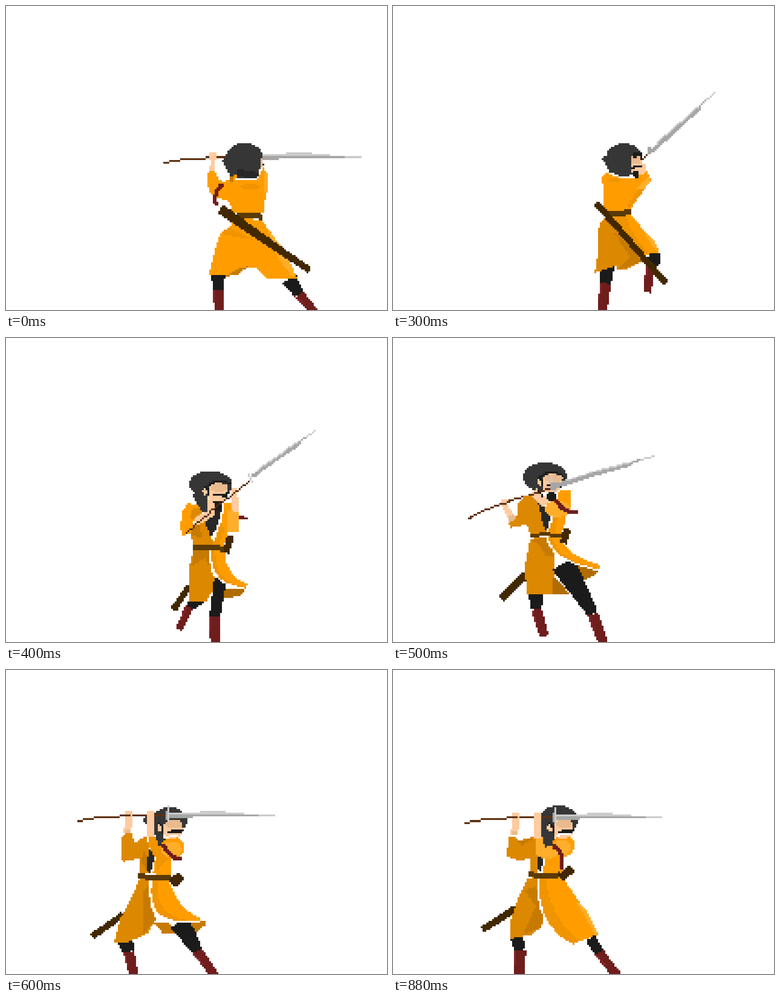
An HTML page with a canvas that plays this animation: 838 px wide and 669 px high, repeating every 1000 ms.

```html
<!DOCTYPE html>
<html>
<head>
<meta charset="utf-8">
<title>Lance guard turn</title>
<style>
html, body { margin: 0; width: 100%; height: 100%; overflow: hidden; background: #fff; }
canvas { display: block; }
</style>
</head>
<body>
<canvas id="stage" width="838" height="669"></canvas>
<script>
const COLS = 208, ROWS = 166, CELL = 838 / COLS;
const ORANGE = '#ff9d00', GLOW = '#ffae2b', SOFT = '#f09400', SHADE = '#dc8800', DEEP = '#c67a00', UNDER = '#b06c00';
const HAIR = '#363636', DARK = '#272727', BLACK = '#1b1b1b', SKIN = '#ffcb9f', TAN = '#e9ba8e';
const BOOT = '#6f1d1d', RED = '#85262a', BELT = '#5a3a08', SHEATH = '#422800', WOOD = '#5e3111';
const PALE = '#cbcbcb', STEEL = '#a6a6a6', WHITE = '#fff';

const stage = document.getElementById('stage').getContext('2d');
let g;

// ---- Drawing on the coarse grid, in stage units, without smoothing ----

function poly(color, ...p) {
  g.fillStyle = color;
  const n = p.length;
  for (let row = 0; row < ROWS; row++) {
    const y = (row + 0.5) * CELL, hits = [];
    for (let i = 0; i < n; i += 2) {
      const x1 = p[i], y1 = p[i + 1], x2 = p[(i + 2) % n], y2 = p[(i + 3) % n];
      if (y1 <= y !== y2 <= y) hits.push(x1 + (y - y1) / (y2 - y1) * (x2 - x1));
    }
    hits.sort((a, b) => a - b);
    for (let i = 0; i + 1 < hits.length; i += 2) {
      const a = Math.round(hits[i] / CELL), b = Math.round(hits[i + 1] / CELL);
      if (b > a) g.fillRect(a, row, b - a, 1);
    }
  }
}

function rect(color, x1, y1, x2, y2) {
  const [a, b, c, d] = [x1, y1, x2, y2].map(v => Math.round(v / CELL));
  g.fillStyle = color;
  g.fillRect(a, b, c - a, d - b);
}

function oval(color, x, y, rx, ry) {
  const p = [];
  for (let a = 0; a < 2 * Math.PI; a += Math.PI / 24) p.push(x + rx * Math.cos(a), y + ry * Math.sin(a));
  poly(color, ...p);
}

// Straight bar whose width runs from w1 to w2.
function tube(color, x1, y1, w1, x2, y2, w2) {
  const d = 2 * Math.hypot(x2 - x1, y2 - y1), nx = (y1 - y2) / d, ny = (x2 - x1) / d;
  poly(color, x1 + nx * w1, y1 + ny * w1, x2 + nx * w2, y2 + ny * w2,
    x2 - nx * w2, y2 - ny * w2, x1 - nx * w1, y1 - ny * w1);
}

const bend = (a, c, b, t) => (1 - t) * (1 - t) * a + 2 * t * (1 - t) * c + t * t * b;

// Quadratic curve stepped with a brush of w by h cells.
function curve(color, w, h, x1, y1, cx, cy, x2, y2) {
  const sag = Math.hypot(cx - (x1 + x2) / 2, cy - (y1 + y2) / 2);
  const n = Math.ceil((Math.max(Math.abs(x2 - x1), Math.abs(y2 - y1)) + 1.5 * sag) / CELL);
  g.fillStyle = color;
  for (let i = 0; i <= n; i++)
    g.fillRect(Math.floor(bend(x1, cx, x2, i / n) / CELL), Math.floor(bend(y1, cy, y2, i / n) / CELL), w, h);
}

function line(color, w, h, x1, y1, x2, y2) {
  curve(color, w, h, x1, y1, (x1 + x2) / 2, (y1 + y2) / 2, x2, y2);
}

// ---- Parts of the figure ----

// Level lance, placed by the butt of its shaft.
function lance(x, y) {
  const row = (c, a, b, r) => rect(c, x + a, y + r * CELL, x + b, y + (r + 1) * CELL);
  [0, 12, 36, 92, 196].forEach((a, i, all) => { if (i < 4) row(WOOD, a, all[i + 1], -i); });
  row(PALE, 270, 326, -5);
  row(PALE, 200, 366, -4);
  row(STEEL, 200, 398, -3);
  row(PALE, 398, 434, -3);
  row(STEEL, 200, 253, -2);
  rect(PALE, x + 196, y - 32, x + 200, y + 4);
  rect(STEEL, x + 192, y - 20, x + 196, y);
}

// Tilted blade: a lit upper edge and a thin pale tip.
function blade(x1, y1, x2, y2) {
  const dx = x2 - x1, dy = y2 - y1;
  line(PALE, 1, 1, x1, y1, x2, y2);
  line(STEEL, 1, 1, x1, y1, x1 + dx * 0.86, y1 + dy * 0.86);
  line(STEEL, 2, 2, x1, y1, x1 + dx * 0.74, y1 + dy * 0.74);
  line(PALE, 1, 1, x1 + dx * 0.1, y1 + dy * 0.1 - 2, x1 + dx * 0.74, y1 + dy * 0.74 - 2);
}

// Trouser leg from x1,y1 to the boot top at x2,y2, boot on to x3,y3.
function leg(x1, y1, w1, x2, y2, w2, x3, y3) {
  tube(BLACK, x1, y1, w1, x2, y2, w2);
  tube(BOOT, x2, y2, w2, x3, y3, w2 - 3);
  const left = x2 - w2 / 2 + 2;
  line(RED, 1, 1, left, y2 + 4, left + (x3 - x2) / 2, (y2 + y3) / 2);
}

// Front skirt panel between an inner and an outer curve, with a white hem.
function skirt(inner, outer) {
  const band = (color, k) => {
    const p = [], q = [];
    for (let t = 0; t <= 1.001; t += 0.05) {
      const at = c => [bend(c[0], c[2], c[4], t), bend(c[1], c[3], c[5], t)];
      const [a, b] = at(inner), [c, d] = at(outer);
      p.push(a, b);
      q.unshift(a + (c - a) * k, b + (d - b) * k);
    }
    poly(color, ...p, ...q);
  };
  band(ORANGE, 1);
  band(SOFT, 0.3);
  curve(WHITE, 1, 1, ...inner.map((v, i) => i % 2 ? v : v - 3));
}

function face(x, y) {
  oval(SKIN, x, y, 23, 21);
  oval(TAN, x + 4, y - 11, 19, 9);
  oval(SKIN, x - 27, y - 4, 6, 9);
  curve(BLACK, 1, 1, x - 28, y - 12, x - 20, y - 8, x - 20, y + 6);
  line(BLACK, 2, 1, x - 8, y + 6, x + 18, y + 2);
  line(BLACK, 2, 1, x, y + 4, x + 14, y + 8);
}

function sleeve(x, y) {
  oval(ORANGE, x, y, 25, 24);
  oval(GLOW, x - 3, y + 5, 21, 18);
}

// Both arms raised to a level lance.
function raise(y) {
  lance(158, y);
  rect(SKIN, 262, y - 21, 278, y - 12);
  rect(SKIN, 274, y - 12, 278, y - 4);
  tube(SKIN, 270, y - 8, 16, 267, y + 28, 16);
  rect(TAN, 260, y + 20, 274, y + 28);
  tube(SKIN, 318, y - 21, 16, 319, y + 35, 14);
}

// ---- Poses ----

function backGuard() {
  lance(347, 343);
  rect(SKIN, 447, 323, 463, 339);
  tube(SKIN, 455, 339, 8, 453, 368, 12);
  poly(ORANGE, 447, 362, 459, 362, 470, 382, 482, 388, 500, 371, 552, 382, 566, 354, 575, 376, 567, 456, 500, 456,
    490, 430, 466, 422, 446, 408, 443, 376);
  tube(GLOW, 571, 366, 7, 571, 412, 7);
  oval(SOFT, 538, 397, 22, 6);
  tube(DEEP, 499, 371, 8, 493, 388, 8);
  curve(BOOT, 2, 2, 474, 392, 452, 414, 460, 432);
  tube(HAIR, 486, 332, 26, 510, 366, 36);
  oval(HAIR, 525, 338, 41, 37);
  tube(HAIR, 530, 350, 60, 529, 378, 44);
  tube(DARK, 532, 362, 54, 529, 378, 44);
  rect(WHITE, 504, 378, 552, 382);
  rect(TAN, 560, 336, 564, 354);
  rect(BLACK, 564, 346, 568, 350);
  leg(467, 590, 32, 467, 624, 22, 468, 674);
  leg(622, 600, 36, 645, 634, 22, 680, 676);
  poly(ORANGE, 508, 464, 564, 472, 606, 530, 632, 580, 640, 602, 572, 600, 548, 576, 526, 574, 500, 594,
    447, 592, 456, 550, 472, 500, 490, 486);
  poly(SOFT, 472, 500, 490, 486, 548, 516, 516, 510);
  poly(DEEP, 480, 596, 514, 576, 534, 573, 508, 592);
  poly(GLOW, 572, 484, 606, 530, 632, 580, 632, 598, 600, 558);
  curve(BELT, 1, 3, 508, 457, 540, 455, 562, 460);
  tube(SHEATH, 472, 447, 22, 668, 582, 14);
}

function lift() {
  line(WOOD, 1, 1, 546, 340, 562, 324);
  blade(566, 318, 708, 191);
  rect(STEEL, 560, 310, 568, 326);
  leg(577, 546, 26, 566, 570, 20, 560, 630);
  leg(472, 572, 32, 468, 610, 24, 460, 674);
  poly(SHADE, 456, 476, 470, 464, 548, 560, 512, 580, 492, 582, 494, 570, 444, 588, 452, 540, 452, 490);
  poly(DEEP, 488, 500, 524, 530, 548, 564, 494, 582, 520, 552);
  poly(ORANGE, 474, 460, 524, 460, 560, 502, 584, 536, 584, 546, 548, 546);
  poly(SOFT, 488, 464, 512, 464, 526, 496, 562, 546, 544, 544);
  poly(GLOW, 548, 490, 574, 514, 584, 540, 568, 524);
  tube(BLACK, 578, 544, 24, 576, 570, 20);
  poly(ORANGE, 460, 374, 470, 367, 500, 378, 536, 378, 556, 358, 568, 382, 532, 428, 524, 450, 464, 450, 464, 425);
  rect(SOFT, 476, 377, 500, 386);
  poly(SOFT, 536, 406, 556, 400, 524, 442, 512, 444);
  poly(GLOW, 536, 402, 562, 376, 567, 386, 552, 404);
  curve(BELT, 1, 3, 466, 451, 500, 456, 522, 448);
  tube(SHEATH, 448, 434, 14, 600, 610, 14);
  oval(HAIR, 508, 338, 40, 36);
  tube(HAIR, 468, 330, 18, 490, 360, 30);
  oval(SKIN, 546, 358, 11, 14);
  rect(SKIN, 524, 332, 548, 366);
  rect(TAN, 524, 332, 544, 348);
  curve(BLACK, 2, 2, 528, 330, 530, 322, 541, 324);
  rect(BLACK, 544, 328, 548, 340);
  rect(BLACK, 526, 350, 548, 354);
  rect(BLACK, 524, 354, 532, 358);
  oval(BLACK, 534, 370, 6, 9);
}

function turn() {
  tube(SHEATH, 404, 544, 12, 368, 598, 15);
  leg(430, 574, 24, 402, 592, 18, 380, 642);
  poly(UNDER, 480, 552, 528, 550, 516, 566, 480, 574);
  poly(SHADE, 412, 470, 450, 470, 450, 510, 466, 536, 440, 582, 404, 582, 403, 500);
  poly(DEEP, 412, 468, 448, 468, 448, 504, 438, 484, 408, 502);
  leg(472, 530, 28, 460, 612, 24, 460, 674);
  skirt([452, 468, 450, 544, 526, 550], [482, 468, 482, 524, 532, 542]);
  poly(SHADE, 424, 388, 440, 400, 454, 440, 454, 458, 412, 458, 406, 432);
  poly(DEEP, 412, 410, 424, 404, 432, 440, 408, 434);
  poly(ORANGE, 400, 364, 428, 366, 432, 382, 412, 402, 412, 416, 404, 432, 388, 434, 383, 418, 387, 380);
  poly(SHADE, 410, 374, 430, 372, 430, 384, 412, 400, 404, 392);
  poly(DARK, 430, 366, 476, 362, 474, 396, 452, 442, 440, 410);
  poly(ORANGE, 480, 364, 492, 360, 510, 390, 508, 424, 488, 428, 480, 458, 454, 458, 474, 404);
  poly(SOFT, 474, 404, 480, 426, 468, 458, 454, 458);
  curve(WHITE, 1, 1, 476, 378, 474, 406, 453, 440);
  tube(GLOW, 500, 380, 22, 499, 427, 22);
  tube(SKIN, 501, 332, 14, 505, 382, 14);
  rect(BOOT, 512, 391, 524, 399);
  rect(BOOT, 524, 395, 532, 399);
  curve(BELT, 1, 3, 413, 459, 446, 454, 478, 460);
  tube(SHEATH, 494, 436, 14, 484, 472, 14);
  oval(HAIR, 450, 322, 47, 29);
  tube(HAIR, 424, 340, 28, 440, 382, 18);
  tube(SKIN, 452, 356, 16, 452, 390, 18);
  tube(SKIN, 452, 386, 16, 418, 404, 18);
  face(466, 340);
  curve(BLACK, 1, 1, 444, 326, 464, 310, 494, 320);
  tube(BLACK, 467, 358, 22, 466, 378, 12);
  curve(WOOD, 1, 1, 397, 429, 462, 370, 536, 314);
  blade(540, 302, 680, 204);
  line(PALE, 1, 1, 533, 300, 541, 315);
}

function swing() {
  curve(WOOD, 1, 1, 166, 397, 230, 363, 302, 345);
  tube(SHEATH, 294, 520, 18, 238, 574, 15);
  leg(314, 560, 34, 316, 597, 23, 333, 656);
  poly(UNDER, 348, 516, 388, 563, 348, 563);
  poly(UNDER, 390, 488, 454, 512, 444, 522, 412, 536);
  poly(SHADE, 302, 442, 342, 438, 356, 480, 350, 564, 294, 564, 290, 500);
  poly(DEEP, 304, 444, 342, 438, 354, 480, 338, 480, 322, 456);
  leg(374, 496, 56, 440, 607, 24, 464, 676);
  skirt([343, 436, 344, 486, 452, 510], [372, 438, 366, 470, 457, 500]);
  poly(SHADE, 290, 346, 318, 348, 340, 410, 340, 432, 302, 432, 294, 410, 258, 418, 254, 404, 272, 390, 276, 364);
  poly(DARK, 318, 356, 338, 372, 352, 396, 340, 428, 330, 410);
  poly(ORANGE, 346, 396, 378, 388, 378, 406, 370, 434, 340, 434);
  poly(SOFT, 348, 396, 362, 394, 356, 434, 340, 434);
  curve(WHITE, 1, 1, 349, 393, 347, 408, 341, 424);
  tube(ORANGE, 378, 334, 26, 376, 380, 28);
  oval(GLOW, 362, 376, 28, 18);
  curve(BELT, 1, 2, 303, 433, 340, 428, 374, 434);
  tube(SHEATH, 384, 420, 18, 374, 452, 14);
  tube(SKIN, 244, 356, 16, 246, 374, 10);
  tube(SKIN, 247, 370, 12, 264, 402, 18);
  tube(TAN, 258, 390, 16, 264, 402, 18);
  line(WOOD, 1, 1, 238, 366, 254, 360);
  oval(HAIR, 334, 306, 48, 32);
  tube(SKIN, 308, 338, 20, 338, 364, 20);
  face(350, 320);
  curve(BLACK, 1, 1, 324, 308, 350, 282, 376, 308);
  line(BLACK, 1, 1, 322, 338, 329, 350);
  line(WOOD, 1, 1, 302, 345, 346, 331);
  oval(BLACK, 348, 348, 10, 10);
  curve(BOOT, 2, 2, 358, 356, 372, 382, 402, 382);
  blade(358, 322, 574, 260);
  line(STEEL, 2, 2, 352, 326, 440, 298);
  line(PALE, 1, 1, 347, 307, 355, 336);
  rect(STEEL, 346, 318, 358, 334);
}

function settle() {
  tube(SHEATH, 258, 538, 14, 190, 586, 14);
  leg(262, 594, 36, 270, 620, 24, 282, 676);
  poly(DEEP, 326, 556, 356, 556, 380, 580, 346, 580);
  leg(382, 554, 50, 421, 618, 22, 462, 676);
  poly(SHADE, 294, 460, 319, 460, 319, 520, 330, 548, 312, 580, 266, 600, 238, 600, 252, 545, 274, 505);
  poly(DEEP, 302, 484, 318, 470, 318, 520, 330, 548, 304, 580);
  poly(DEEP, 406, 558, 438, 550, 438, 562, 418, 577);
  skirt([322, 460, 306, 572, 428, 552], [358, 462, 376, 524, 430, 548]);
  poly(SHADE, 256, 362, 278, 358, 282, 380, 308, 366, 318, 400, 314, 448, 294, 448, 294, 414, 258, 422, 254, 414);
  poly(DEEP, 304, 400, 314, 412, 314, 446, 296, 420);
  poly(DARK, 314, 390, 328, 412, 318, 448, 310, 440);
  poly(ORANGE, 312, 366, 344, 384, 362, 410, 362, 454, 322, 448, 330, 414, 316, 392);
  poly(SOFT, 312, 366, 330, 368, 356, 414, 328, 448, 330, 414, 316, 392);
  line(WHITE, 1, 1, 326, 424, 322, 444);
  curve(BELT, 1, 3, 292, 449, 326, 456, 360, 452);
  tube(SHEATH, 386, 452, 20, 364, 470, 22);
  oval(HAIR, 360, 332, 38, 30);
  oval(HAIR, 314, 331, 11, 10);
  tube(HAIR, 332, 340, 20, 344, 386, 16);
  sleeve(367, 390);
  face(366, 350);
  curve(WHITE, 1, 1, 354, 370, 360, 362, 376, 364);
  curve(BOOT, 2, 2, 344, 386, 364, 414, 379, 414);
  raise(331);
}

function frontGuard() {
  tube(SHEATH, 270, 524, 16, 197, 572, 14);
  leg(272, 588, 28, 280, 616, 26, 277, 674);
  leg(434, 590, 24, 454, 621, 22, 494, 674);
  poly(SHADE, 296, 458, 319, 456, 319, 510, 331, 545, 328, 564, 306, 582, 258, 592, 258, 552, 280, 490);
  poly(DEEP, 290, 484, 314, 476, 331, 545, 326, 566, 286, 584, 314, 520);
  skirt([322, 456, 318, 568, 396, 603], [370, 456, 412, 504, 451, 582]);
  poly(GLOW, 400, 506, 424, 526, 450, 576, 448, 588, 416, 532);
  poly(SHADE, 254, 366, 270, 366, 274, 376, 312, 366, 322, 412, 320, 446, 302, 446, 302, 416, 274, 418, 250, 410);
  poly(DEEP, 274, 376, 312, 370, 282, 386);
  poly(DARK, 320, 412, 334, 414, 326, 442, 318, 440);
  poly(ORANGE, 314, 366, 374, 404, 374, 450, 328, 450, 334, 416, 316, 408);
  poly(GLOW, 312, 366, 326, 364, 366, 406, 342, 416, 316, 408);
  line(WHITE, 1, 1, 334, 418, 327, 440);
  curve(BELT, 1, 3, 300, 445, 330, 452, 366, 447);
  tube(SHEATH, 394, 436, 20, 368, 458, 18);
  oval(HAIR, 364, 332, 42, 34);
  tube(HAIR, 334, 345, 24, 346, 386, 24);
  sleeve(374, 386);
  face(373, 350);
  curve(WHITE, 1, 1, 362, 366, 368, 356, 388, 360);
  curve(BOOT, 2, 2, 352, 386, 374, 396, 367, 432);
  raise(335);
}

function pose(draw) {
  const c = document.createElement('canvas');
  c.width = COLS;
  c.height = ROWS;
  g = c.getContext('2d');
  g.fillStyle = WHITE;
  g.fillRect(0, 0, COLS, ROWS);
  draw();
  return c;
}

const poses = [backGuard, lift, turn, swing, settle, frontGuard].map(pose);
const start = performance.now();

// The first and last pose hold for 300 ms, the others for 100 ms.
function show() {
  const t = (performance.now() - start) % 1000;
  const i = Math.max(0, Math.min(5, Math.floor(t / 100) - 2));
  stage.imageSmoothingEnabled = false;
  stage.drawImage(poses[i], 0, 0, 838, 669);
  requestAnimationFrame(show);
}
show();
</script>
</body>
</html>
```
